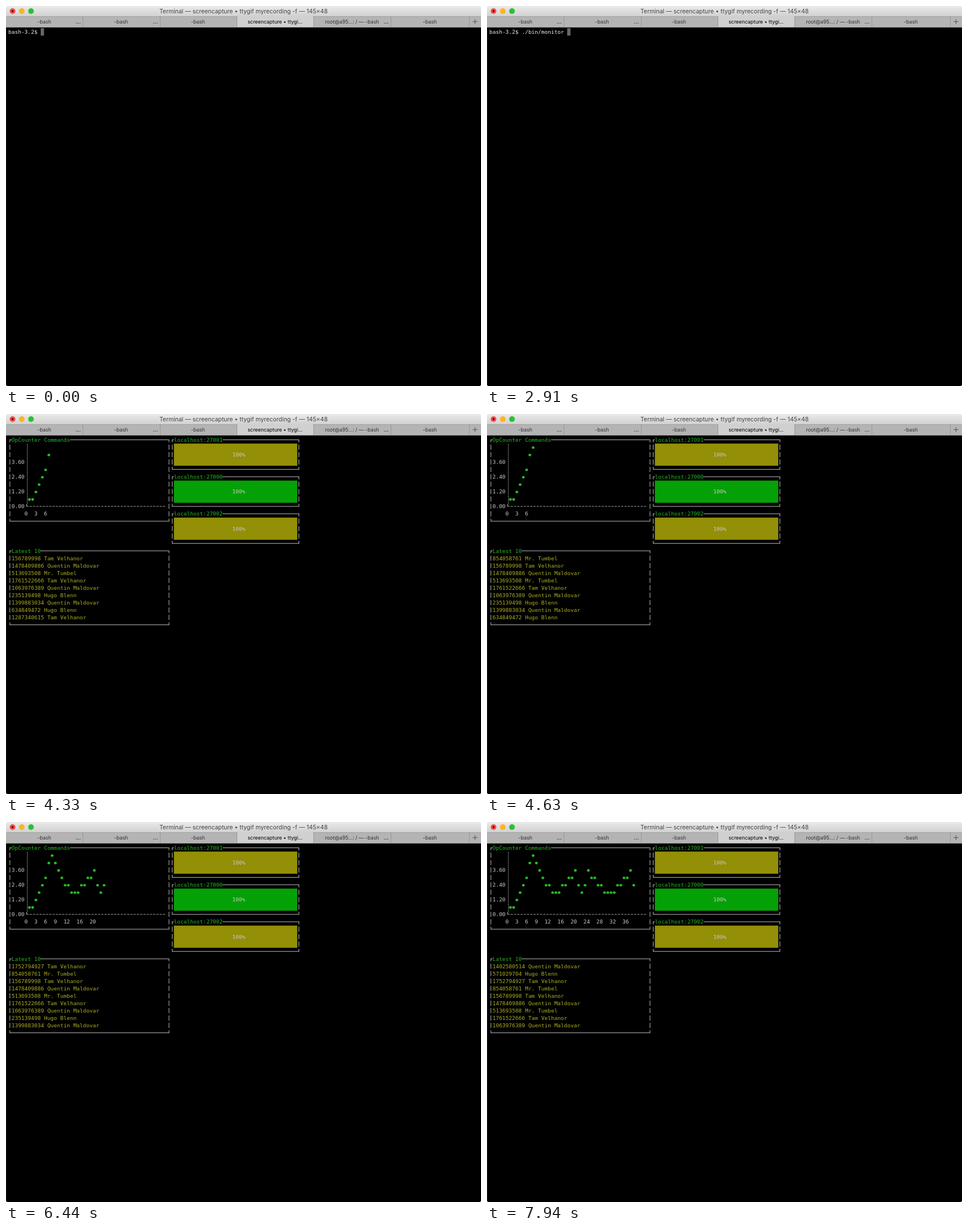
Write an HTML page with a canvas that moves like this. It is 836 px wide and 670 px high and loops after 8000 ms.

```html
<!DOCTYPE html>
<html lang="en">
<head>
<meta charset="utf-8">
<title>Terminal monitor</title>
<style>
html, body { margin: 0; width: 100%; height: 100%; overflow: hidden; background: #fff; }
canvas { display: block; border-radius: 3px; }
</style>
</head>
<body>
<canvas id="stage" width="836" height="670"></canvas>
<script>
const ctx = document.getElementById('stage').getContext('2d');
const LOOP = 8000, CELL = 5.715, ROW = 13.05, LINE = 0.95;
const WHITE = '#c7c7c7', GREEN = '#25bc24', YELLOW = '#adad27';
const MONO = '9.5px "DejaVu Sans Mono", monospace';
const UI = 'Inter, sans-serif';

const colX = c => 4 + c * CELL;         // left edge of a text column
const cellTop = r => 39.1 + r * ROW;    // top edge of a text row
const rowY = r => 45.45 + r * ROW;      // height of a line drawn in a row

const COMMAND = './bin/monitor ';
// [time, value] pairs: each value holds until the next time
const TYPED = [[0, 0], [700, 1], [900, 2], [1130, 3], [1235, 4], [1340, 5], [1720, 6],
  [2150, 7], [2310, 8], [2390, 9], [2470, 10], [2910, 14]];
const POINTS = [[4330, 7], [4630, 8], [4930, 14], [5240, 15], [5540, 21], [5840, 22], [6140, 23],
  [6440, 24], [6740, 25], [7040, 31], [7340, 32], [7640, 38], [7940, 39]];
const OLDER = [[4330, 4], [4630, 3], [5540, 2], [6740, 1], [7640, 0]];

// text row of each plotted point
const PLOT_ROWS = '887654212345566655443565344556666554435';
const X_LABELS = [0, 3, 6, 9, 12, 16, 20, 24, 28, 32, 36];
const [TUM, TAM, QUE, HUG] = ['Mr. Tumbel', 'Tam Velhanor', 'Quentin Maldovar', 'Hugo Blenn'];
const LATEST = [
  [1402580514, QUE], [571029704, HUG], [1752794927, TAM], [854058761, TUM], [156789998, TAM],
  [1478409886, QUE], [513693508, TUM], [1761522666, TAM], [1063976389, QUE], [235139498, HUG],
  [1399883034, QUE], [634849472, HUG], [1287340615, TAM]
].map(entry => entry.join(' '));

function valueAt(steps, t) {
  let value = steps[0][1];
  for (const [time, v] of steps) if (t >= time) value = v;
  return value;
}

function rect(x, y, w, h, color) {
  ctx.fillStyle = color;
  ctx.fillRect(x, y, w, h);
}

const hLine = (x1, x2, y) => rect(x1, y - LINE / 2, x2 - x1, LINE, WHITE);
const vLine = (x, y1, y2) => rect(x - LINE / 2, y1, LINE, y2 - y1, WHITE);

function disc(x, y, rx, ry, color) {
  ctx.fillStyle = color;
  ctx.beginPath();
  ctx.ellipse(x, y, rx, ry, 0, 0, 7);
  ctx.fill();
}

function text(str, col, row, color) {
  ctx.font = MONO;
  ctx.textAlign = 'left';
  ctx.fillStyle = color;
  ctx.fillText(str, colX(col), rowY(row) + 3.5);
}

function label(str, x, y, font, color) {
  ctx.font = font + ' ' + UI;
  ctx.textAlign = 'center';
  ctx.fillStyle = color;
  ctx.fillText(str, x, y);
}

function dashed(x1, y1, x2, y2, dash) {
  ctx.strokeStyle = '#a4a4a4';
  ctx.lineWidth = 1;
  ctx.setLineDash(dash);
  ctx.beginPath();
  ctx.moveTo(x1, y1);
  ctx.lineTo(x2, y2);
  ctx.stroke();
}

function chrome() {
  const shade = ctx.createLinearGradient(0, 0, 0, 18);
  shade.addColorStop(0, '#eaeaea');
  shade.addColorStop(1, '#d1d1d1');
  rect(0, 0, 836, 18, shade);
  disc(11.5, 9, 5, 5, '#fc4948');
  disc(11.5, 9, 1.8, 1.8, '#4a0504');
  disc(27.8, 9, 5, 5, '#fdb424');
  disc(44, 9, 5, 5, '#29c131');
  label('Terminal — screencapture • ttygif myrecording -f — 145×48', 418, 13, '10.4px', '#444');

  rect(0, 18, 836, 20, '#b4b4b4');
  rect(407, 18, 135, 20, '#d0d0d0');
  rect(0, 18, 407, 1, '#a2a2a2');
  rect(542, 18, 294, 1, '#a2a2a2');
  rect(0, 37, 836, 1, '#8e8e8e');
  for (const x of [135, 271, 406, 541, 677, 815]) rect(x, 18, 1, 19, '#989898');
  for (const x of [67.5, 202.5, 338, 746]) label('-bash', x, 31, '9px', '#333');
  label('screencapture • ttygi…', 473.5, 31, '8.9px', '#000');
  label('root@a95…: / — -bash', 609, 31, '8.9px', '#333');
  for (const x of [127, 263, 669]) label('…', x, 31, 'bold 9px', '#333');
  rect(821, 27, 9, 1, '#555');
  rect(825, 23, 1, 9, '#555');
}

function box(col, row, lastCol, lastRow, title) {
  const left = colX(col + 0.5), right = colX(lastCol + 0.5);
  const top = rowY(row), bottom = rowY(lastRow);
  hLine(left, title ? colX(col + 1) : right, top);
  if (title) {
    hLine(colX(col + 1 + title.length), right, top);
    text(title, col + 1, row, GREEN);
  }
  hLine(left, right, bottom);
  for (const x of [left, right]) {
    vLine(x, top - LINE / 2, top + 4.5);
    vLine(x, bottom - 4.5, bottom + LINE / 2);
    for (let r = row + 1; r < lastRow; r++) vLine(x, rowY(r) - 4.5, rowY(r) + 4.5);
  }
}

function gauge(row, host, color) {
  box(50, row, 89, row + 4, host);
  rect(colX(51), cellTop(row + 1), 38 * CELL, 3 * ROW, color);
  if (!host) rect(colX(69), cellTop(row + 2), 4 * CELL, ROW, '#949494');
  text('100%', 69, row + 2, host ? WHITE : '#000');
}

function plot(count) {
  ['3.60', '2.40', '1.20', '0.00'].forEach((s, i) => text(s, 1, 3 + 2 * i, WHITE));
  dashed(37.5, 53, 37.5, 159, [2, ROW / 4 - 2]);
  dashed(36, rowY(9), 282, rowY(9), [4, CELL - 4]);
  vLine(36.5, rowY(9) - 4, rowY(9));
  for (const n of X_LABELS) if (n < count) text(String(n), 5 + n, 10, WHITE);
  for (let i = 0; i < count; i++) {
    disc(colX(6.5 + i), rowY(+PLOT_ROWS[i]) + 0.8, 2.5, 2.3, GREEN);
  }
}

function shell(t) {
  const typed = valueAt(TYPED, t), entered = t >= 3880;
  text('bash-3.2$ ' + COMMAND.slice(0, typed), 0, 0, '#eee');
  rect(colX(entered ? 0 : 10 + typed), cellTop(entered ? 1 : 0), CELL, ROW, '#686868');
}

function dashboard(t) {
  const live = t >= 4330;
  box(0, 0, 49, 11, 'OpCounter Commands');
  ['#938f07', '#04a106', '#938f07'].forEach((color, i) => {
    const host = live && 'localhost:2700' + [1, 0, 2][i];
    gauge(5 * i, host, live ? color : '#cecece');
  });
  if (!live) return;
  plot(valueAt(POINTS, t));
  box(0, 15, 49, 25, 'Latest 10');
  const first = valueAt(OLDER, t);
  LATEST.slice(first, first + 9).forEach((line, i) => text(line, 1, 16 + i, YELLOW));
}

function draw() {
  const t = performance.now() % LOOP;
  rect(0, 0, 836, 670, '#000');
  rect(0, 38, 1, 632, '#1c1c1c');
  chrome();
  if (t < 3950) shell(t);
  else if (t >= 4020) dashboard(t);
  requestAnimationFrame(draw);
}
draw();
</script>
</body>
</html>
```
